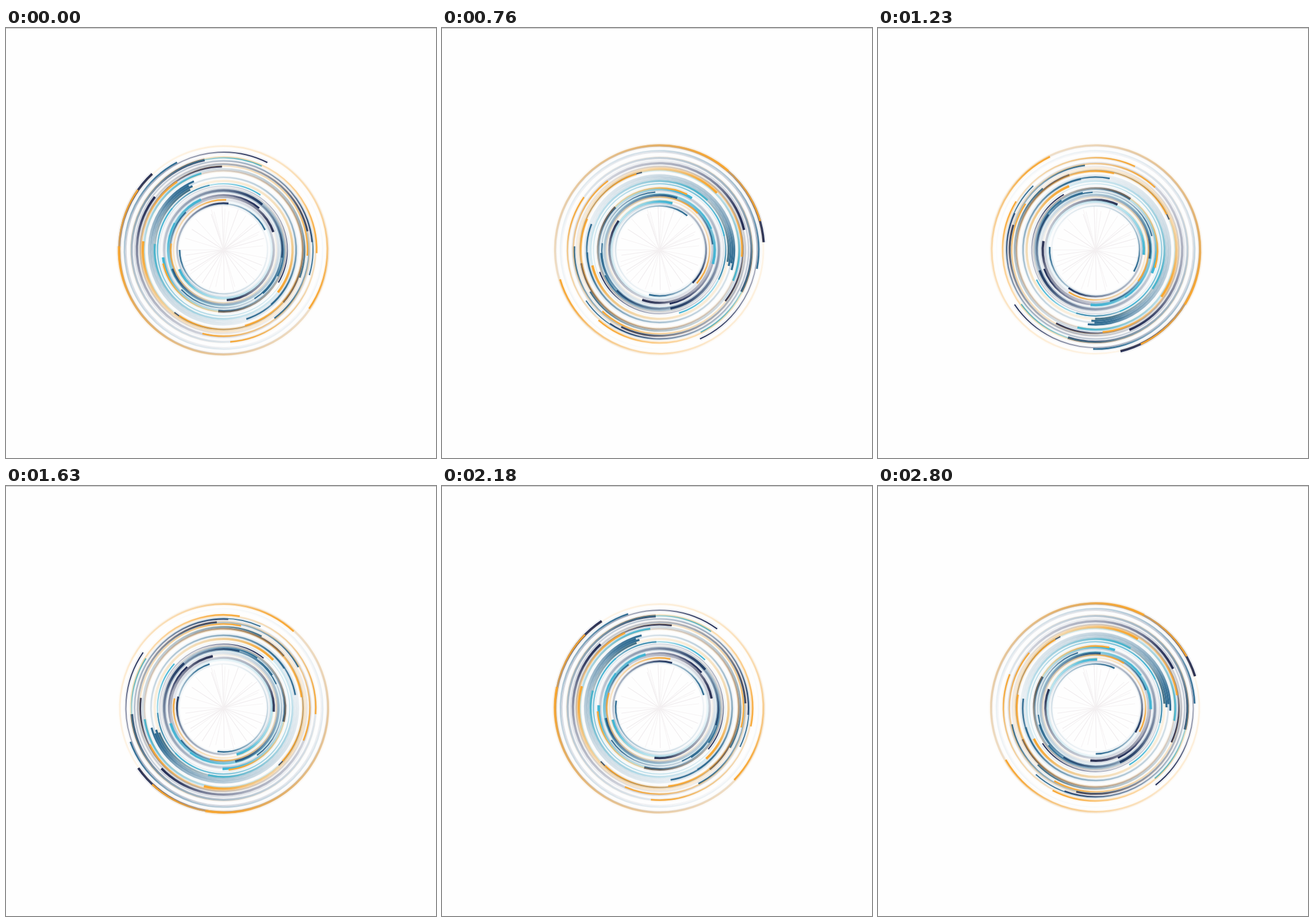
Recreate the animation shown at these times as an HTML page with a canvas. Size 748 by 748 pixels, loop 2.88 s.

```html
<!DOCTYPE html>
<html lang="en">
<head>
<meta charset="utf-8">
<title>Spinning arcs</title>
<style>
  html, body { margin: 0; width: 100%; height: 100%; overflow: hidden; background: #fefefe; }
  canvas { display: block; width: 100%; height: 100%; }
</style>
</head>
<body>
<canvas id="stage" width="748" height="748"></canvas>
<script>
const ctx = document.getElementById('stage').getContext('2d');
const CX = 378.5, CY = 386, LOOP = 2880;
const rad = deg => (deg - 90) * Math.PI / 180;   // 0 degrees points up, clockwise

const NAVY = '#1f2a54', TEAL = '#2c6990', CYAN = '#3fb4d4', ORANGE = '#f8a630';

// How a tail fades: [degrees behind the head, opacity]
const FADE = [[0, 1], [16, 0.88], [32, 0.56], [60, 0.34], [110, 0.19], [170, 0.09], [240, 0.03], [300, 0]];

const arcs = [];

// Adds comets of one colour and width; spots are radius, head angle pairs
function comets(color, width, ...spots) {
  for (let i = 0; i < spots.length; i += 2) {
    arcs.push({ width, r: spots[i], head: spots[i + 1], paint: fade(color, spots[i + 1]) });
  }
}

function fade(color, head) {
  const g = ctx.createConicGradient(rad(head + 0.8), 0, 0);
  g.addColorStop(0, color + '00');
  for (const [back, alpha] of FADE.slice().reverse()) {
    const hex = Math.round(alpha * 255).toString(16).padStart(2, '0');
    g.addColorStop(1 - (back + 0.8) / 360, color + hex);
  }
  g.addColorStop(1, color);
  return g;
}

comets(NAVY, 2, 170, 26.6, 154.5, 85, 138.5, 218.2, 111, 120.8);
comets(NAVY, 3, 145, 358.9, 149.5, 77.5, 138, 131.3, 102.5, 97.6, 81.2, 6, 95.4, 40.4);
comets(NAVY, 4, 181.5, 316.8, 160, 348.1, 151, 307.7, 107, 185, 87.3, 176.4, 92, 70.2, 103.7, 40.5, 95.4, 249.8);
comets(TEAL, 2, 155.5, 106.4, 100.4, 147.7, 115, 347.7, 100.8, 226.8);
comets(TEAL, 2.7, 172.5, 332, 141, 110, 148.3, 143.4, 126, 139, 126.7, 161.8,
  102, 138, 104.6, 116, 80, 64.3, 76.5, 270, 93, 315);
comets(TEAL, 3.3, 130, 336.6, 126.8, 331.5, 123.4, 334, 120, 331);
comets(CYAN, 2.2, 160.2, 24.5, 115, 33.9, 115, 309);
comets(CYAN, 3.3, 138.5, 343.8, 120, 275, 97, 298.8);
comets(CYAN, 4.5, 106, 263, 96, 335.8, 84.2, 246.4);
comets(ORANGE, 2.5, 162, 92, 146, 94, 160.4, 175.9, 150, 194.2, 87, 3, 92, 277, 138, 214);
comets(ORANGE, 3, 180.5, 124.5, 182, 305, 137, 164.2, 143.5, 325.7, 107.8, 257.3);
comets(ORANGE, 4, 182, 272, 140.5, 276.1, 120, 128);

const RAYS = [-19, -17, -14, -2, 2, 8, 20, 33, 48, 52, 63, 66, 74, 84, 101, 112, 122, 134,
  145, 163, 166, 179, 192, 200, 213, 223, 234, 238, 247, 253, 262, 270, 287, 303, 318];

function drawRays() {
  ctx.lineWidth = 1.1;
  RAYS.forEach((deg, i) => {
    const len = 66 + (i * 7) % 11, a = rad(deg);
    ctx.strokeStyle = i % 3 ? '#f5f2f3' : '#efebed';
    ctx.beginPath();
    ctx.moveTo(0, 0);
    ctx.lineTo(len * Math.cos(a), len * Math.sin(a));
    ctx.stroke();
  });
}

function strokeArc(arc, extra, alpha) {
  ctx.globalAlpha = alpha;
  ctx.lineWidth = arc.width + extra;
  ctx.strokeStyle = arc.paint;
  ctx.beginPath();
  ctx.arc(0, 0, arc.r, rad(arc.head - 300), rad(arc.head));
  ctx.stroke();
}

// Length of each hold in units of 10 ms
const HOLDS = [...'7887887887888887888888887888788989858'].map(Number);

function holdStart(t) {
  let start = 0;
  for (const hold of HOLDS) {
    if (t < start + hold * 10) break;
    start += hold * 10;
  }
  return start;
}

// Rotation keys: [ms, degrees]
const TURN = [[0, 0], [300, 57.4], [760, 129], [1230, 209.4], [1630, 278], [2180, 369.5], [2800, 475.5]];

function turnAt(t) {
  let i = 1;
  while (i < TURN.length - 1 && t > TURN[i][0]) i++;
  const [t0, a0] = TURN[i - 1], [t1, a1] = TURN[i];
  return a0 + (a1 - a0) * (t - t0) / (t1 - t0);
}

function draw(t) {
  ctx.globalAlpha = 1;
  ctx.fillStyle = '#fefefe';
  ctx.fillRect(0, 0, 748, 748);
  ctx.fillStyle = '#bdbdbd';
  ctx.fillRect(0, 0, 748, 1);
  ctx.save();
  ctx.translate(CX, CY);
  drawRays();
  ctx.rotate(turnAt(t) * Math.PI / 180);
  for (const arc of arcs) strokeArc(arc, 5, 0.08);
  for (const arc of arcs) strokeArc(arc, 0, 1);
  ctx.restore();
}

const origin = performance.now();
let shown = -1;

function tick() {
  const start = holdStart((performance.now() - origin) % LOOP);
  if (start !== shown) draw(shown = start);
  requestAnimationFrame(tick);
}
tick();
</script>
</body>
</html>
```
